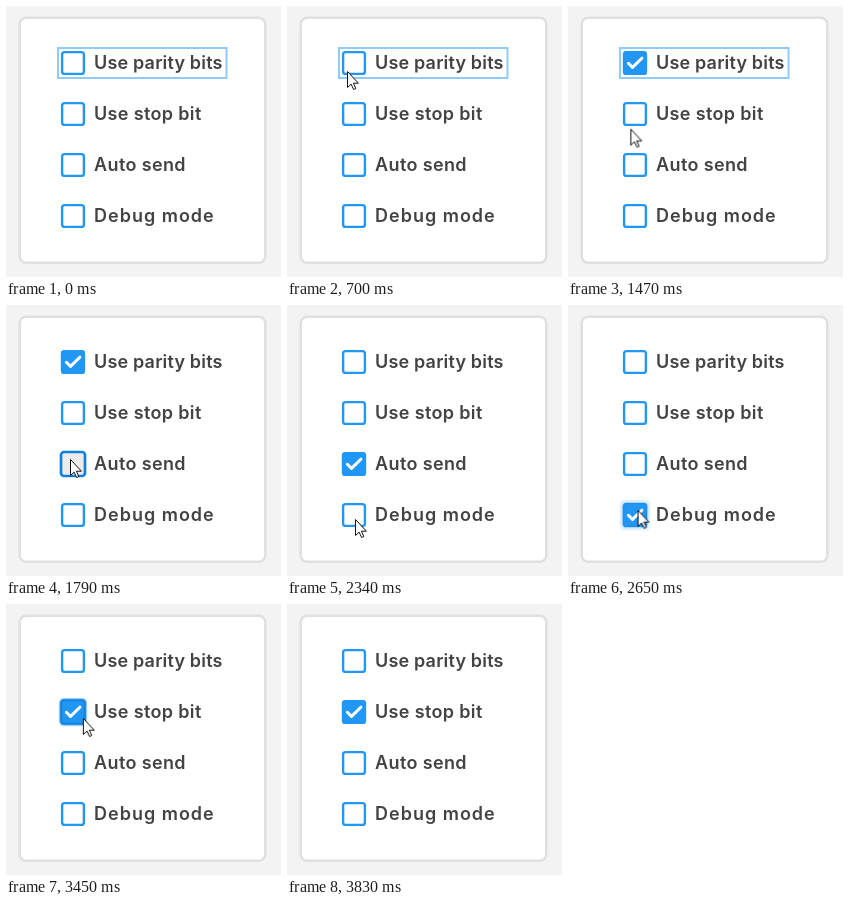
Write an HTML page that moves like this. It is 275 by 271 pixels and loops after 4300 ms.

```html
<!DOCTYPE html>
<html lang="en">
<head>
<meta charset="utf-8">
<title>Checkbox list</title>
<style>
html, body { margin: 0; width: 100%; height: 100%; overflow: hidden; background: #f3f3f3; }
svg { display: block; width: 275px; height: 271px; }
text { font: 600 18px Inter, "Open Sans", sans-serif; fill: #434343; }

.card { fill: #fff; stroke: #e0e0e0; stroke-width: 2.6; }
.focus { fill: none; stroke: #90caf9; stroke-width: 2; animation: hide 1ms 1790ms forwards; }
.box { fill: #fff; stroke: #2196f3; stroke-width: 2.4; }
.on { opacity: 0; animation: show 157ms linear var(--in) forwards, hide 157ms linear var(--out) forwards; }
.on rect { fill: #2196f3; }
.on path { fill: none; stroke: #fff; stroke-width: 3; stroke-linecap: round; stroke-linejoin: round; }
.press, .ripple { opacity: 0; }
.press { animation: press 280ms linear var(--in); }
.ripple { fill: none; stroke: #2196f3; stroke-width: 2; animation: ripple 400ms ease-out var(--in); }
.shade { fill: #ececec; }
.edge { fill: none; stroke: #1380dc; stroke-width: 2.7; }
.cursor { animation: move 4300ms linear; }
.cursor path { fill: #fff; stroke: #111; stroke-width: 1; }

@keyframes show { from { opacity: 0; } to { opacity: 1; } }
@keyframes hide { from { opacity: 1; } to { opacity: 0; } }
@keyframes press { 0%, 50% { opacity: 1; } 100% { opacity: 0; } }
@keyframes ripple {
  0%, 30% { opacity: 0; transform: scale(1); }
  31% { opacity: .3; transform: scale(1.05); }
  100% { opacity: 0; transform: scale(1.28); }
}
@keyframes move {
  0%, 5.3% { transform: translate(203px, 300px); }
  5.35% { transform: translate(203px, 258px); animation-timing-function: cubic-bezier(.25, .55, .5, .95); }
  16.28% { transform: translate(60px, 65px); animation-timing-function: ease-out; }
  21.74%, 27.2% { transform: translate(59px, 59px); animation-timing-function: ease-in-out; }
  39.3%, 42.56% { transform: translate(64px, 154px); animation-timing-function: ease-in-out; }
  51.86%, 59.5% { transform: translate(68px, 214px); animation-timing-function: ease-in; }
  66% { transform: translate(77px, 160px); animation-timing-function: ease-out; }
  72.69%, 78.15% { transform: translate(70px, 105px); animation-timing-function: cubic-bezier(.4, 0, .9, .9); }
  87.25% { transform: translate(178px, 246px); }
  89%, 100% { transform: translate(220px, 300px); }
}
</style>
</head>
<body>
<svg viewBox="0 0 275 271">
  <rect class="card" x="13.7" y="11.7" width="245.6" height="245" rx="6.5"/>
  <rect class="focus" x="52" y="42" width="168.5" height="30"/>
  <g id="rows"></g>
  <g class="cursor"><path d="M.5 .5V16.5L4.1 13.1L6.6 18.5L8.8 17.5L6.4 12.2H11.4Z"/></g>
</svg>
<script>
const LOOP = 4300, STEP = 78.25, ANCHOR = 700;

const rows = [
  { label: "Use parity bits", y: 57, on: 1090, off: 1795, gap: .18 },
  { label: "Use stop bit", y: 108, on: 3281, off: 9999, gap: .35 },
  { label: "Auto send", y: 159, on: 1795, off: 2420, gap: .38 },
  { label: "Debug mode", y: 210, on: 2420, off: 3281, gap: 1 }
];

const square = (name, r, rx) =>
  `<rect class="${name}" x="${-r}" y="${-r}" width="${2 * r}" height="${2 * r}" rx="${rx}"/>`;

document.getElementById("rows").innerHTML = rows.map(({ label, y, on, off, gap }) => `
  <g transform="translate(67 ${y})" style="--in:${on}ms;--out:${off}ms">
    ${square("ripple", 12, 3)}
    ${square("box", 10.9, 2.5)}
    <g class="press">${square("shade", 12, 3)}</g>
    <g class="on">${square("fill", 12.1, 3.7)}<path d="M-6.6 .3L-2.5 4.4L6.9 -4.8"/></g>
    <g class="press">${square("edge", 12, 3)}</g>
    <text x="21" y="6" letter-spacing="${gap}">${label}</text>
  </g>`).join("");

// The motion advances in even ticks, so the timeline is snapped to them.
const timeline = document.getAnimations();
timeline.forEach(a => a.pause());
const start = performance.now();

function draw() {
  const t = (performance.now() - start) % LOOP;
  const tick = Math.floor((t - ANCHOR + 12) / STEP);
  const now = Math.max(0, ANCHOR + tick * STEP);
  timeline.forEach(a => { a.currentTime = now; });
  requestAnimationFrame(draw);
}
draw();
</script>
</body>
</html>
```
